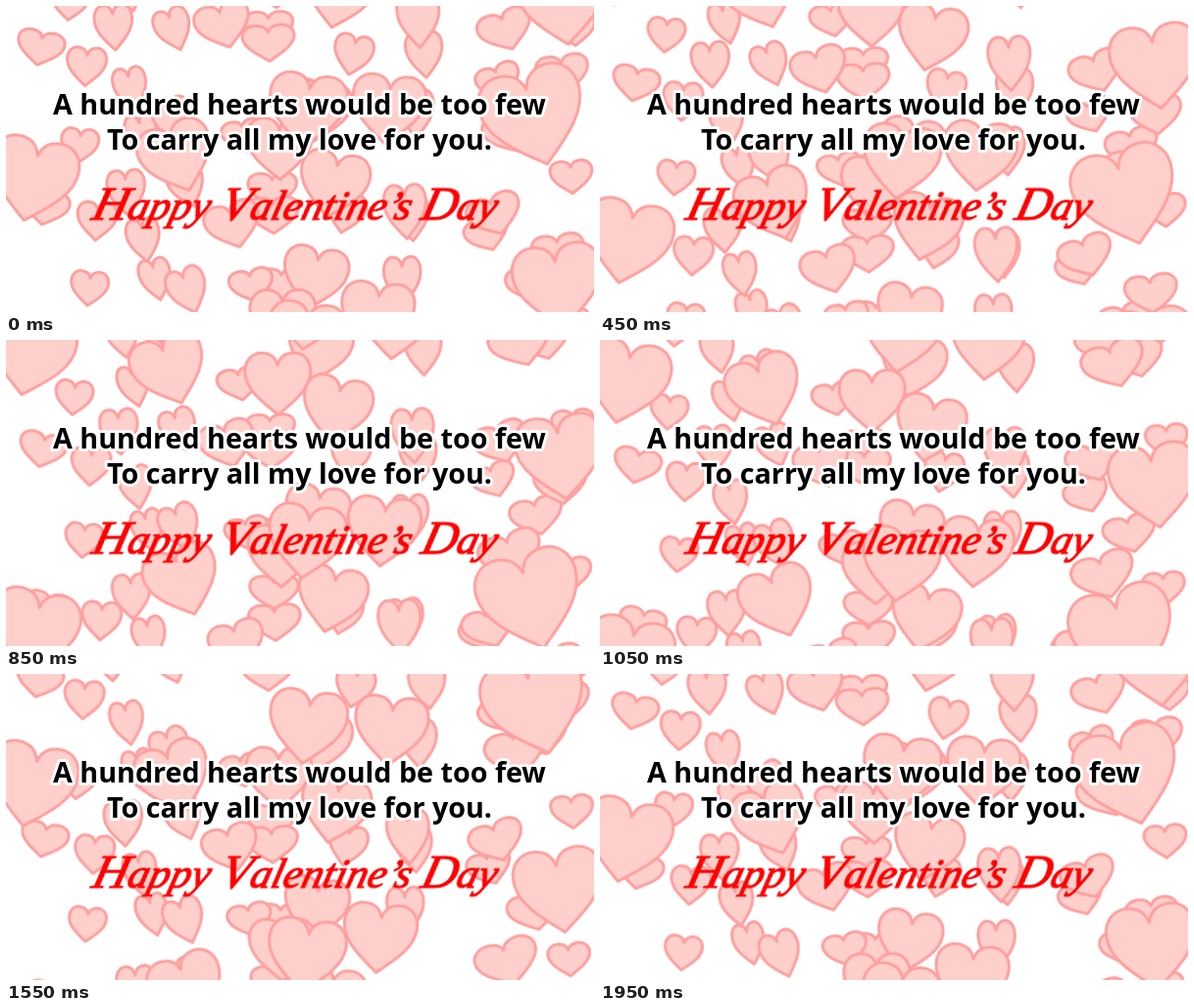
An HTML page for the animation above (2000 ms loop, 600 by 313 pixels).

```html
<!DOCTYPE html>
<html lang="en">
<head>
<meta charset="utf-8">
<title>Valentine hearts</title>
<style>
  html, body { margin: 0; width: 100%; height: 100%; overflow: hidden; background: #fff; }
  svg { display: block; width: 600px; height: 313px; }
  .heart { fill: #ffd0cb; stroke: #ff9f9f; stroke-width: 3; stroke-linejoin: round; vector-effect: non-scaling-stroke; }
  .column { animation: fall 2s steps(40) infinite; }
  @keyframes fall {
    from { transform: translate(0, 0); }
    to { transform: translate(var(--dx), var(--dy)); }
  }
  .verse {
    font: 700 28.7px "Open Sans", "Noto Sans", sans-serif;
    text-anchor: middle;
    fill: #000;
    stroke: #fff; stroke-width: 6; stroke-linejoin: round; paint-order: stroke;
  }
  .wish { font: italic 43px "Liberation Serif", serif; fill: #f00; stroke: #f00; stroke-width: 1.2; }
  .cap { font-size: 50px; }
</style>
</head>
<body>
<svg viewBox="0 0 600 313">
  <g id="sky"></g>
  <g class="verse">
    <text x="299.5" y="111">A hundred hearts would be too few</text>
    <text x="299.5" y="147">To carry all my love for you.</text>
  </g>
  <text class="wish" transform="translate(86 219) skewX(-14)"><tspan class="cap">H</tspan>appy <tspan class="cap">V</tspan>alentine’s <tspan class="cap">D</tspan>ay</text>
</svg>
<script>
  const NS = "http://www.w3.org/2000/svg";
  const LOOP = 2; // seconds
  const HEIGHT = 313;
  // Heart in a unit box around the origin
  const HEART = "M0 .5C-.2 .32-.5 .1-.5-.2C-.5-.4-.37-.5-.25-.5C-.12-.5-.03-.43 0-.3" +
                "C.03-.43 .12-.5 .25-.5C.37-.5 .5-.4 .5-.2C.5 .1 .2 .32 0 .5Z";
  const sky = document.getElementById("sky");

  // Start points of the small hearts, from the slowest to the fastest
  const far = [
    [75, 143], [139, 132], [278, 135], [577, 175], [243, 133], [127, 85], [503, 77],
    [82, 62], [171, 24], [354, 50], [35, 43], [272, 188], [427, 50], [110, 22],
    [418, 110], [172, 118], [268, 38], [545, 104], [568, 70], [510, 25],
    [421, 15], [222, 20], [520, 128]
  ];
  // Start points and speeds of the large hearts
  const near = [
    [318, 108, 85], [276, -30, 88], [334, 183, 97], [390, 106, 106], [175, 155, 108],
    [307, 107, 117], [27, 178, 142], [568, -3, 145], [539, 114, 180]
  ];

  function add(parent, tag, attrs) {
    const node = document.createElementNS(NS, tag);
    for (const key in attrs) node.setAttribute(key, attrs[key]);
    return parent.appendChild(node);
  }

  // Equal hearts one loop apart: each falls to the place of the next.
  // Tilt and sideways drift vary in waves across the stage.
  function column(x, y, speed, size, aspect) {
    const gap = speed * LOOP;
    const drift = 14 * Math.sin(x / 95);
    const tilt = 16 * Math.cos((x - 30) / 50) - 4;
    const w = size * Math.sqrt(aspect);
    const h = size / Math.sqrt(aspect);
    const group = add(sky, "g", { class: "column" });
    group.style.setProperty("--dx", drift + "px");
    group.style.setProperty("--dy", gap + "px");
    for (let k = -3; k < 4; k++) {
      const top = y + k * gap;
      if (top < -gap - 70 || top > HEIGHT + 70) continue;
      add(group, "path", {
        class: "heart", d: HEART,
        transform: `translate(${x + k * drift} ${top}) rotate(${tilt}) scale(${w} ${h})`
      });
    }
  }

  far.forEach(([x, y], i) => {
    const u = i / (far.length - 1);
    const speed = 73 + 19 * u + 16 * u ** 8;
    column(x, y, speed, speed / 2, 1.1 - 0.35 * Math.cos((x - 140) / 42));
  });
  near.forEach(([x, y, speed]) => column(x, y, speed, 30 + 0.4 * speed, 1.06));
</script>
</body>
</html>
```
